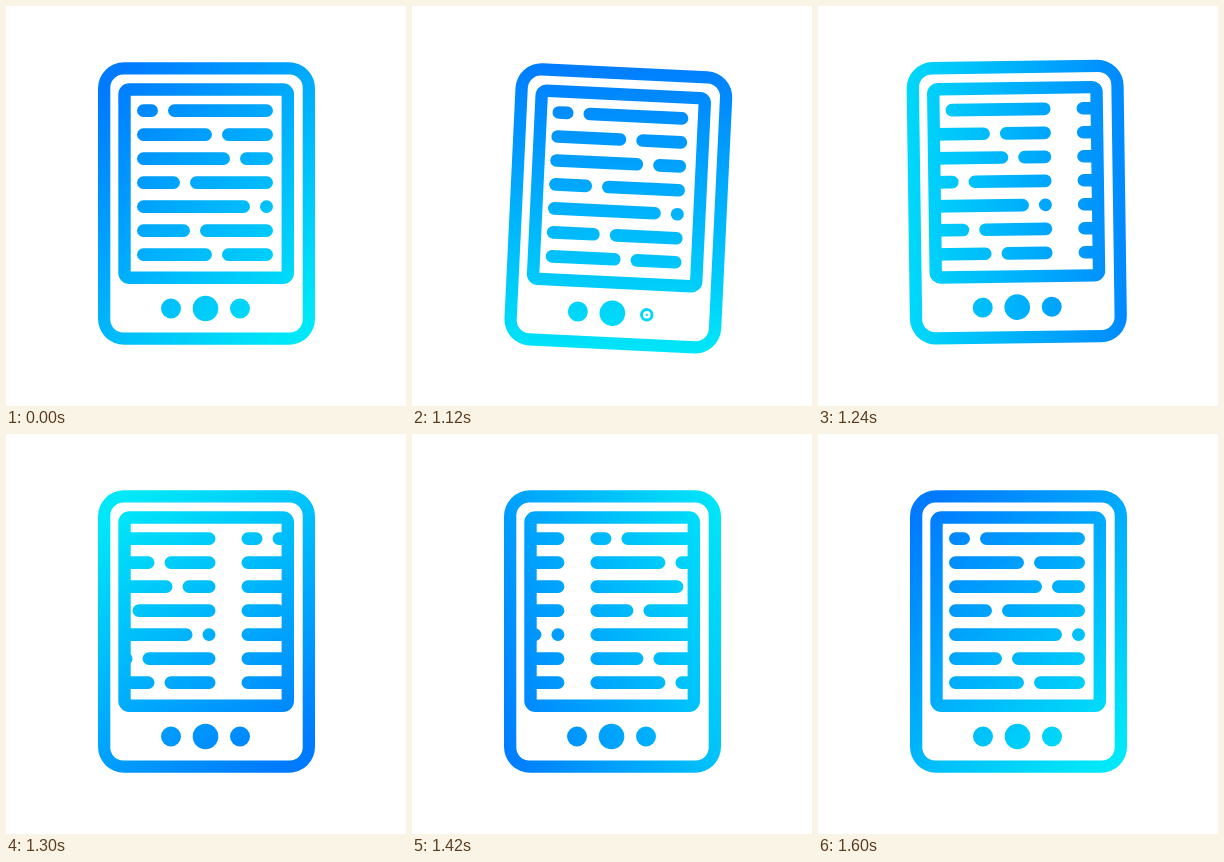
An HTML page with a canvas for the animation above (1.69 s loop, 400 by 400 pixels).

```html
<!DOCTYPE html>
<html>
<head>
<meta charset="utf-8">
<style>
  html, body { margin: 0; height: 100%; overflow: hidden; background: #fff; }
  canvas { display: block; }
</style>
</head>
<body>
<canvas id="stage" width="400" height="400"></canvas>
<script>
const ctx = document.getElementById('stage').getContext('2d');
const LOOP = 1690, PAGE = 162, LEFT = 131, RIGHT = 267, GAP = 10;
const breaks = [152, 206, 224, 174, 244, 184, 206]; // end of the first bar in each row

const ease = (t, from, to) => {
  const p = Math.min(1, Math.max(0, (t - from) / (to - from)));
  return p * p * (3 - 2 * p);
};

function gradient(turn) {
  const a = (225 + turn) * Math.PI / 180;
  const dx = 152 * Math.cos(a), dy = 152 * Math.sin(a);
  const g = ctx.createLinearGradient(200.5 + dx, 197.5 + dy, 200.5 - dx, 197.5 - dy);
  g.addColorStop(0, '#007aff');
  g.addColorStop(1, '#00e8f8');
  return g;
}

function frame(x, y, w, h, r, inset, innerR) {
  ctx.beginPath();
  ctx.roundRect(x, y, w, h, r);
  ctx.roundRect(x + inset, y + inset, w - 2 * inset, h - 2 * inset, innerR);
  ctx.fill('evenodd');
}

function disc(x, y, r) {
  ctx.beginPath();
  ctx.arc(x, y, r, 0, 7);
  ctx.fill();
}

function page(offset) {
  ctx.beginPath();
  breaks.forEach((end, row) => {
    const y = 98.3 + 24 * row;
    const bar = (a, b) => ctx.roundRect(a + offset, y, b - a, 12.6, 6.3);
    bar(LEFT, end);
    bar(end + GAP, RIGHT);
  });
  ctx.fill();
}

function draw(t) {
  const tilt = 3 * ease(t, 1000, 1105) - 4.1 * ease(t, 1105, 1210) + 1.1 * ease(t, 1210, 1300);
  const press = ease(t, 1000, 1105) - ease(t, 1105, 1210);
  const scroll = PAGE * ease(t, 1100, 1600);
  const paint = gradient(360 * ease(t, 1000, 1580));

  ctx.fillStyle = '#fff';
  ctx.fillRect(0, 0, 400, 400);
  ctx.save();
  ctx.translate(102, 322);
  ctx.rotate(tilt * Math.PI / 180);
  ctx.translate(-102, -322);
  ctx.fillStyle = paint;

  frame(92, 56.3, 217, 282.5, 26, 12.3, 13);
  frame(112.3, 77.3, 175.7, 200.7, 11, 12.4, 0);

  disc(165, 302.5, 10);
  disc(199.5, 302.5, 12.8);
  disc(234, 302.5, 10 - 3.5 * press);
  const hole = Math.max(0, 2 * press - 1);
  if (hole) {
    ctx.fillStyle = '#fff';
    disc(234, 302.5, 4.3 * hole);
    ctx.fillStyle = paint;
    disc(234, 302.5, 1.2);
  }

  ctx.beginPath();
  ctx.rect(118, 83, 164, 190);
  ctx.clip();
  page(-scroll);
  page(PAGE - scroll);
  ctx.restore();
}

const start = performance.now();
function tick() {
  draw((performance.now() - start) % LOOP);
  requestAnimationFrame(tick);
}
tick();
</script>
</body>
</html>
```
